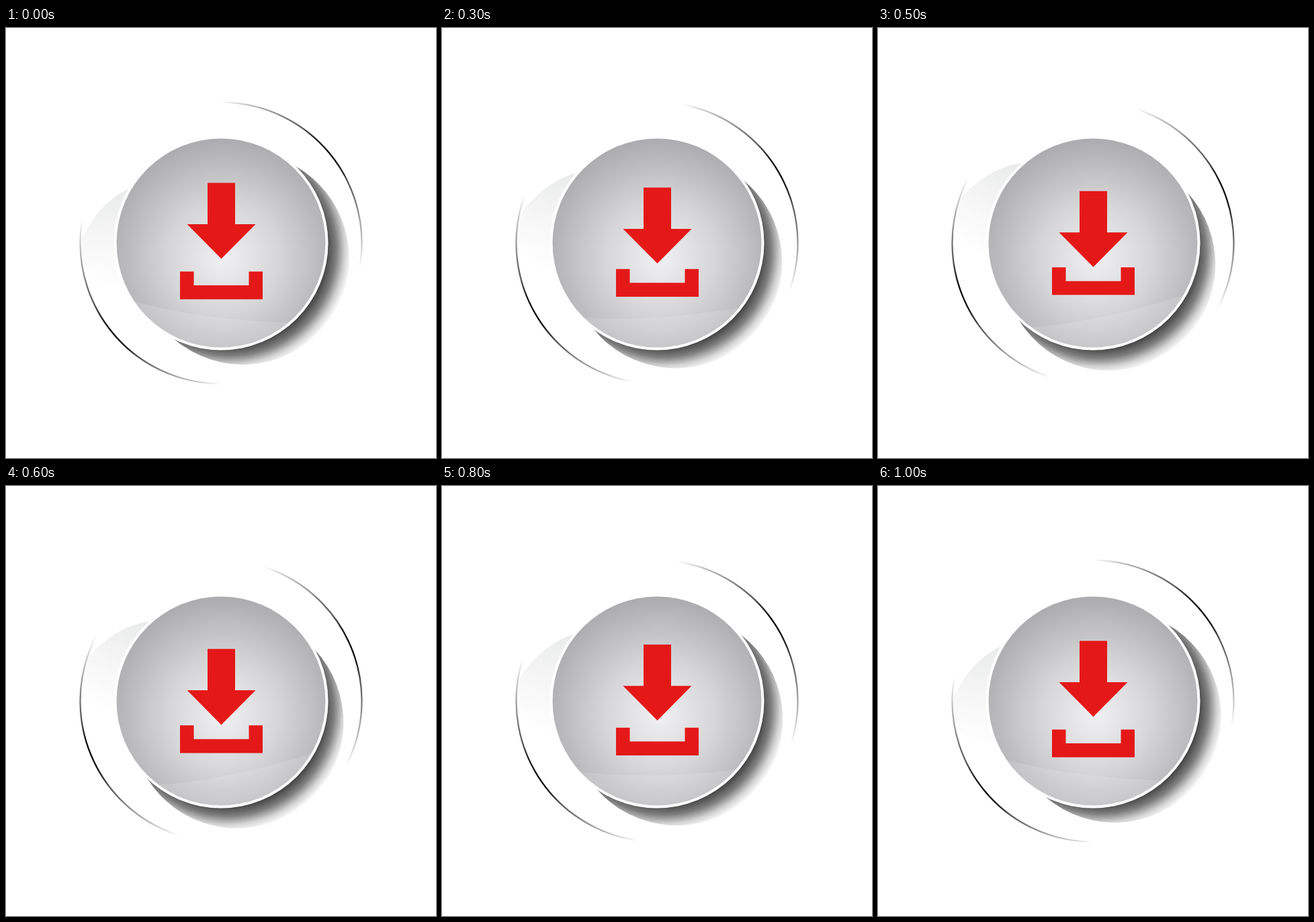
Write an HTML page without scripts that moves like this. It is 640 by 640 pixels and loops after 1.1 s.

```html
<!DOCTYPE html>
<html lang="en">
<head>
<meta charset="utf-8">
<title>Download button</title>
<style>
  @property --p {
    syntax: "<number>";
    inherits: true;
    initial-value: 0;
  }
  html, body {
    margin: 0;
    width: 100%;
    height: 100%;
    overflow: hidden;
    background: #fff;
  }
  svg {
    display: block;
    width: 100%;
    height: 100%;
    animation: press 1100ms step-end infinite;
  }
  /* --p is how far the button is pressed; every part follows it */
  @keyframes press {
    0% { --p: 0 }
    9.09% { --p: .08 }
    18.18% { --p: .28 }
    27.27% { --p: .57 }
    36.36% { --p: .83 }
    45.45% { --p: .99 }
    54.54% { --p: .97 }
    63.63% { --p: .76 }
    72.72% { --p: .44 }
    81.81% { --p: .14 }
    90.9% { --p: .01 }
    100% { --p: 0 }
  }
  .turn, .gloss { transform-origin: 320px 320px }
  .turn { transform: rotate(calc(var(--p) * 18deg)) }
  .gloss { transform: rotate(calc(var(--p) * -20deg)) }
  .arrow { transform: translateY(calc(var(--p) * 12.4px)) }
  .tray { transform: translateY(calc(var(--p) * -6.4px)) }
</style>
</head>
<body>
<svg viewBox="0 0 640 640">
  <defs>
    <radialGradient id="face" gradientUnits="userSpaceOnUse" cx="324" cy="342" r="184">
      <stop offset="0" stop-color="#f1f1f3"/>
      <stop offset=".45" stop-color="#d6d6d8"/>
      <stop offset="1" stop-color="#a9a9ac"/>
    </radialGradient>
    <radialGradient id="shade" gradientUnits="userSpaceOnUse" cx="335" cy="320" r="183">
      <stop offset=".78" stop-color="#222" stop-opacity=".88"/>
      <stop offset=".87" stop-color="#222" stop-opacity=".58"/>
      <stop offset=".94" stop-color="#222" stop-opacity=".2"/>
      <stop offset="1" stop-color="#222" stop-opacity="0"/>
    </radialGradient>
    <linearGradient id="rim" gradientUnits="userSpaceOnUse" x1="110" y1="0" x2="320" y2="0" spreadMethod="reflect">
      <stop offset="0" stop-color="#000"/>
      <stop offset=".034" stop-color="#000" stop-opacity=".65"/>
      <stop offset=".134" stop-color="#000" stop-opacity=".38"/>
      <stop offset=".36" stop-color="#000" stop-opacity="0"/>
    </linearGradient>
    <linearGradient id="sheen" gradientUnits="userSpaceOnUse" x1="175" y1="240" x2="150" y2="390">
      <stop offset="0" stop-color="#e9eaea"/>
      <stop offset=".5" stop-color="#f6f6f6"/>
      <stop offset="1" stop-color="#fff"/>
    </linearGradient>
    <clipPath id="disc"><circle cx="320" cy="320" r="155.5"/></clipPath>
  </defs>

  <g class="turn">
    <path d="M190 236Q140 256 113 314L112 350Q130 385 190 400Z" fill="url(#sheen)"/>
    <circle cx="320" cy="320" r="209.5" fill="none" stroke="url(#rim)" stroke-width="2.3" transform="rotate(-40 320 320)"/>
    <circle cx="360" cy="320" r="158" fill="url(#shade)" transform="rotate(35 320 320)"/>
  </g>

  <circle cx="320" cy="320" r="159.5" fill="#fff"/>
  <circle cx="320" cy="320" r="155.5" fill="url(#face)"/>
  <g clip-path="url(#disc)">
    <path class="gloss" d="M160 398Q290 440 480 440V500H160Z" fill="#fff" fill-opacity=".13"/>
  </g>

  <g fill="#e51818">
    <path class="arrow" d="M300 230.5H341V292H371.5L320.5 343.5L269.5 292H300Z"/>
    <path class="tray" d="M259 362.5H279.5V383H361.5V362.5H382V403.7H259Z"/>
  </g>
</svg>
</body>
</html>
```
